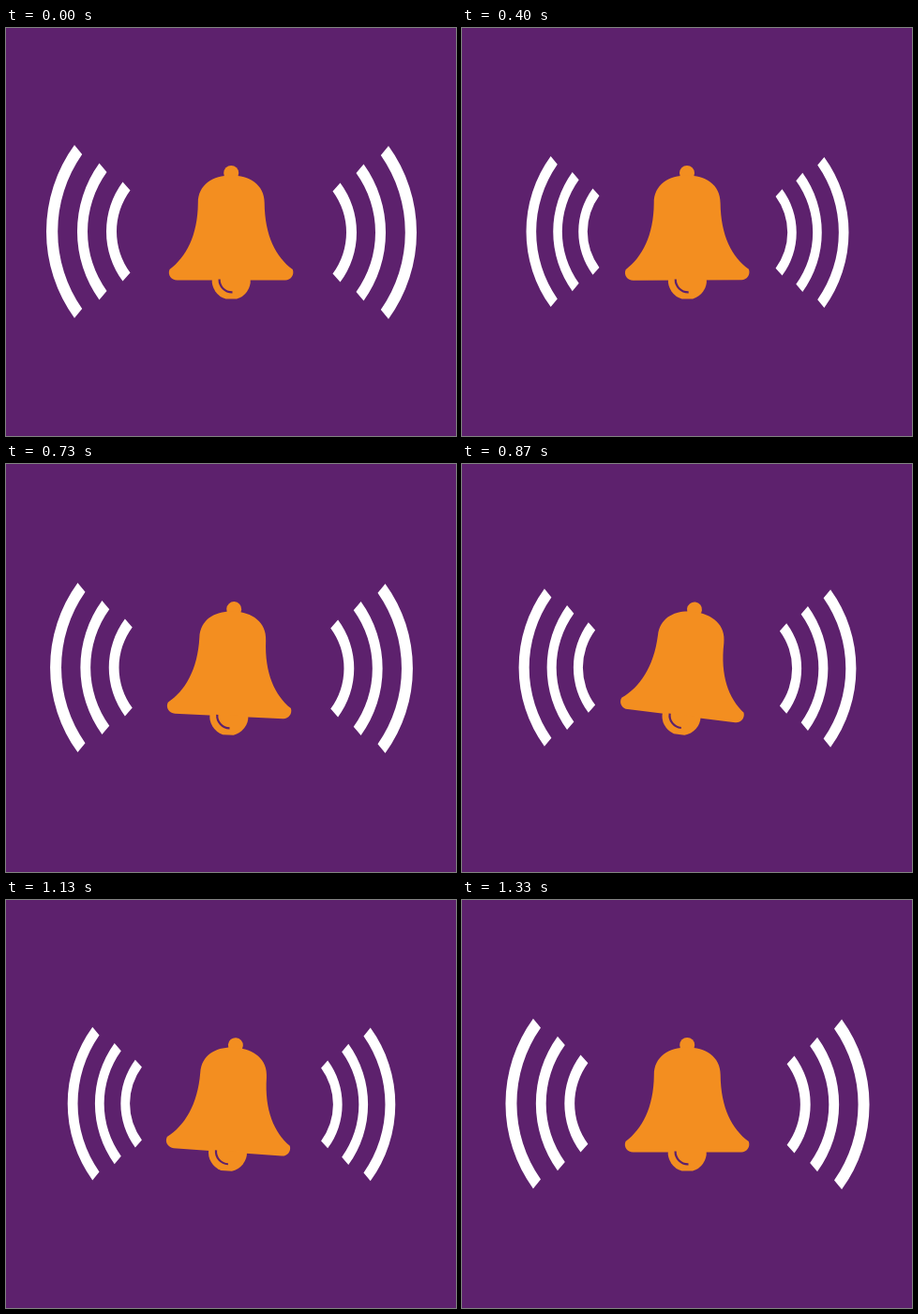
An HTML page for the animation above (1390 ms loop, 480 px wide and 436 px high).

```html
<!DOCTYPE html>
<html lang="en">
<head>
<meta charset="utf-8">
<title>Ringing bell</title>
<style>
  html, body { margin: 0; width: 100%; height: 100%; overflow: hidden; background: #5d216d; }
  svg { display: block; width: 100vw; height: 100vh; }
</style>
</head>
<body>
<svg viewBox="0 0 480 436">
  <defs>
    <g id="side" fill="#fff">
      <path d="M73 125A157.6 157.6 0 0 0 73 310L81.200 300A143.900 143.900 0 0 1 81.200 135Z"/>
      <path d="M99.500 144.500A125 125 0 0 0 99.500 290.500L107.500 281A108.600 108.600 0 0 1 107.500 154Z"/>
      <path d="M124.500 164.500A89 89 0 0 0 124.500 270.500L132.500 261.500A74 74 0 0 1 132.500 173.500Z"/>
    </g>
  </defs>
  <g id="waves">
    <use href="#side"/>
    <use href="#side" transform="rotate(180 240.5 218)"/>
  </g>
  <g id="bell" fill="#f38e20">
    <circle cx="240.2" cy="155" r="8"/>
    <path d="M204.800 187C204.800 167 221 157.500 240.200 157.500S275.700 167 275.700 187C276 222 288 245 305.800 258C308 264 303.500 269.500 298 269.500H182.500C176.500 269.500 172 264 174.500 258C192 245 204.500 222 204.800 187Z"/>
    <path d="M219.800 268A20.500 20.500 0 0 0 234.500 289.500H246A20.500 20.500 0 0 0 260.700 268Z"/>
    <path d="M227.600 268.500A13.400 13.400 0 0 0 241.500 282.300" fill="none" stroke="#5d216d" stroke-width="2.2"/>
  </g>
</svg>
<script>
  const LOOP = 1390, FPS = 15;
  const CYCLE = 10.3;  // steps per ring
  const SWING = [[-0.27, -7], [0.27, 7], [0.47, -4.4], [0.74, 7], [0.93, 0], [1, 0]];

  const bell = document.getElementById('bell');
  const waves = document.getElementById('waves');
  const t0 = performance.now();

  // Steps start on a 10 ms grid
  const startOf = step => Math.round(step * 100 / FPS) * 10;

  function stepAt(t) {
    const step = Math.ceil(t * FPS / 1000);
    return startOf(step) > t ? step - 1 : step;
  }

  // Sine easing between the turning points
  function angleAt(phase) {
    const i = SWING.findIndex(([p]) => p > phase);
    const [p0, a0] = SWING[i - 1], [p1, a1] = SWING[i];
    const mix = (1 - Math.cos(Math.PI * (phase - p0) / (p1 - p0))) / 2;
    return a0 + (a1 - a0) * mix;
  }

  // Shrink until mid-cycle, then grow back the same way
  function scaleAt(phase) {
    const x = 1 - Math.abs(1 - 2 * phase);
    return 1 - 0.136 * (x + x * x * (1 - x));
  }

  function draw(now) {
    const t = Math.max(0, now - t0) % LOOP;
    const phase = stepAt(t) / CYCLE % 1;
    bell.setAttribute('transform', `rotate(${angleAt(phase)} 240.2 219)`);
    waves.setAttribute('transform',
      `translate(240.5 218) scale(${scaleAt(phase)}) translate(-240.5 -218)`);
    requestAnimationFrame(draw);
  }
  draw(t0);
</script>
</body>
</html>
```
